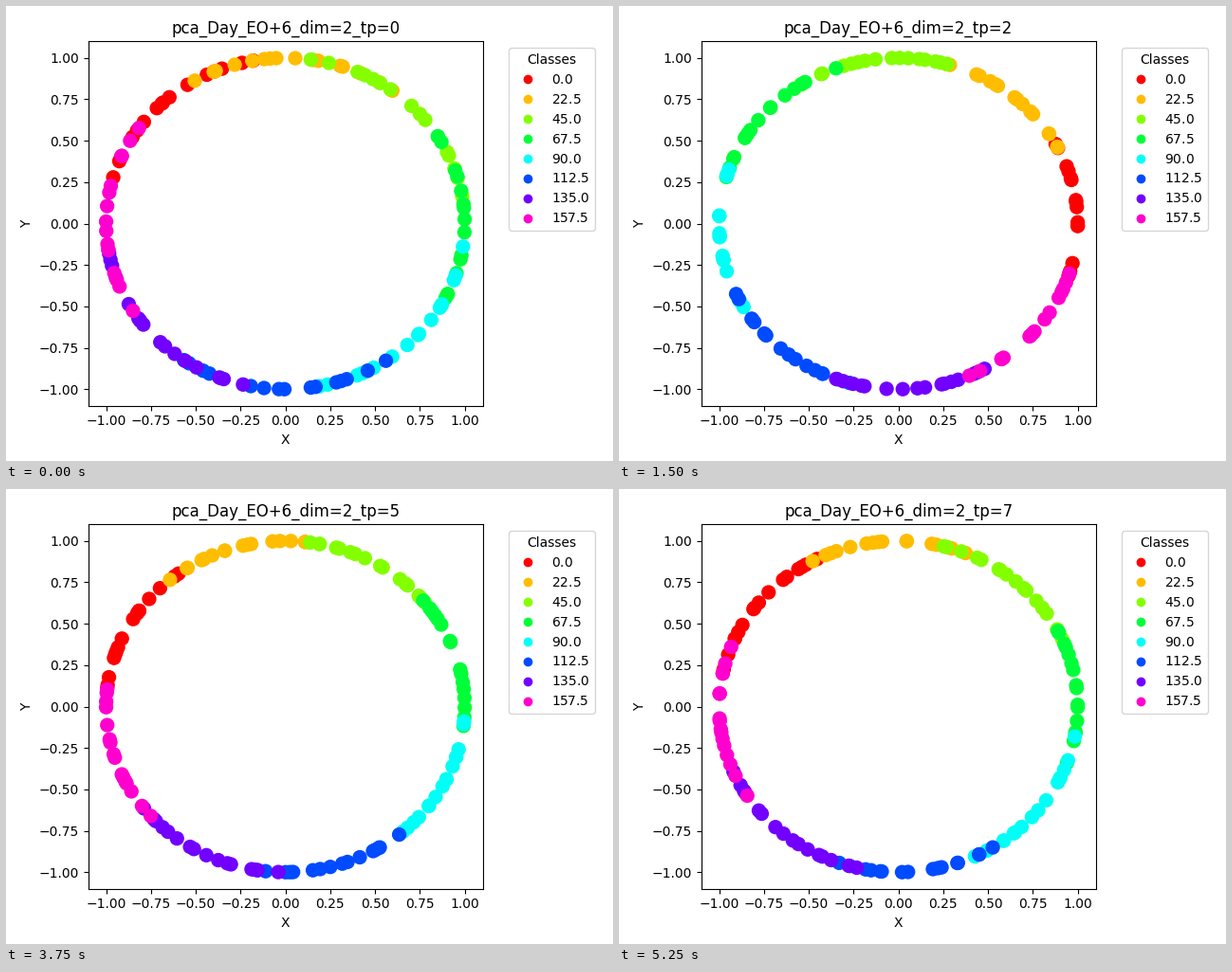
Write a matplotlib script that moves like this. It is 640x480 px and loops after 6000 ms.

```python
import numpy as np
import matplotlib.pyplot as plt
from matplotlib.animation import FuncAnimation

DPI = 100
CLASSES = 8
LABEL_STEP = 22.5
TURN = 360 / CLASSES  # degrees between neighbouring class centres
DOTS = 16             # dots per class

# Per time point: angle of the first class, direction of turn, reach of a class.
DAYS = [(133, -1, 33), (14, 1, 25), (5, 1, 24), (-4, 1, 24),
        (156, -1, 23), (152, -1, 23), (147, -1, 24), (141, -1, 24)]


def ring(tp):
    """Angles and labels of the dots: classes spaced around the circle."""
    start, turn, reach = DAYS[tp]
    rng = np.random.default_rng(tp)
    k = np.repeat(np.arange(CLASSES), DOTS)
    offset = np.tile(np.linspace(-reach, reach, DOTS), CLASSES)
    angle = start + turn * TURN * k + offset + rng.normal(0, 3, k.size)
    return np.radians(angle), k * LABEL_STEP


fig, ax = plt.subplots(figsize=(640 / DPI, 480 / DPI), dpi=DPI)


def update(tp):
    ax.clear()
    t, labels = ring(tp)
    dots = ax.scatter(np.cos(t), np.sin(t), c=labels, s=100,
                      cmap="hsv", vmin=0, vmax=180)
    ax.set(xlabel="X", ylabel="Y", xlim=(-1.1, 1.1), ylim=(-1.1, 1.1),
           title=f"pca_Day_EO+6_dim=2_tp={tp}")
    ax.legend(*dots.legend_elements(), title="Classes",
              bbox_to_anchor=(1.05, 1), loc="upper left")
    return []


# Make room for the legend once; the layout then stays fixed.
update(0)
fig.tight_layout()

anim = FuncAnimation(fig, update, frames=len(DAYS), interval=750,
                     repeat=True, repeat_delay=0)
plt.show()
```
